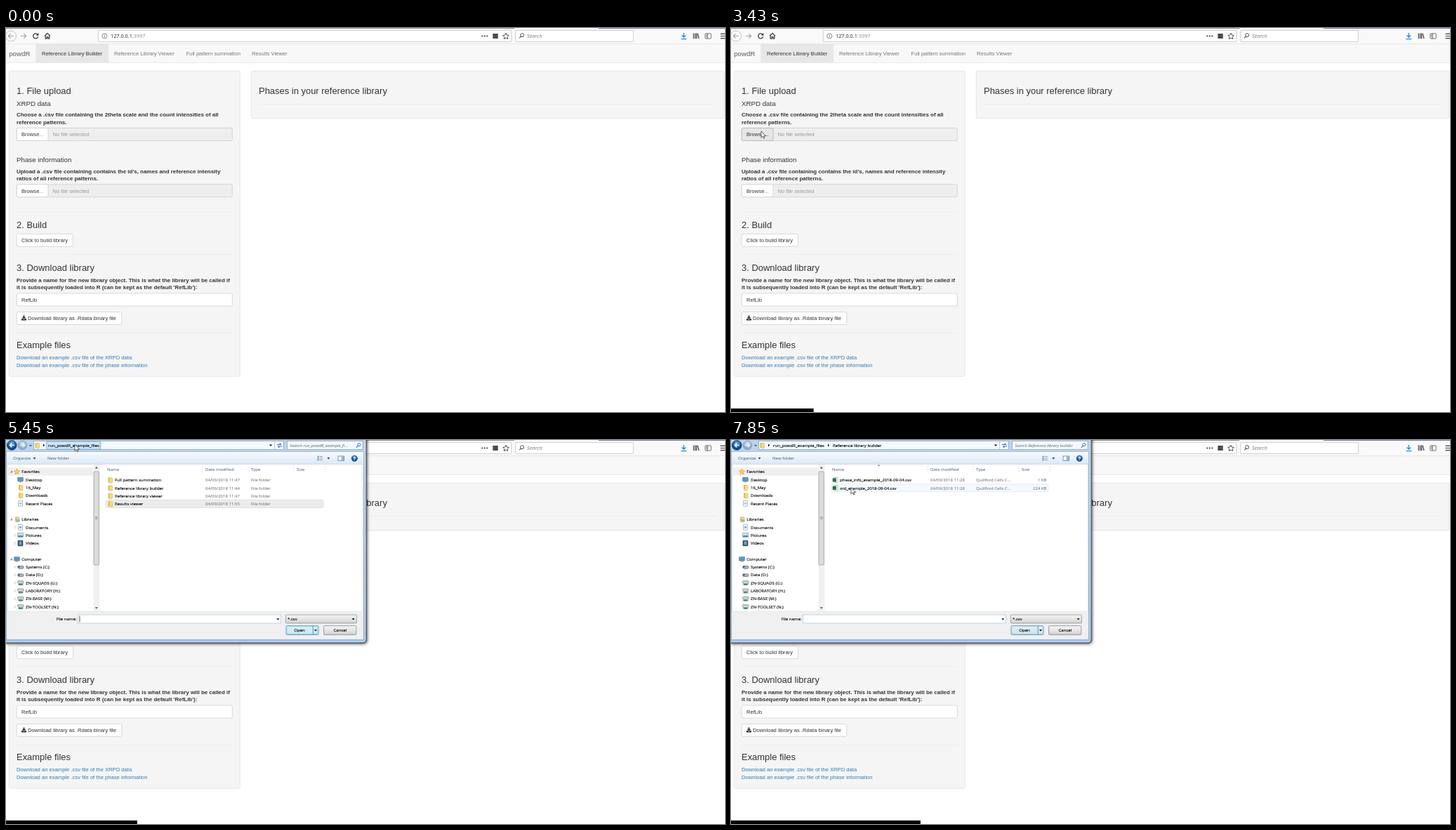
Recreate the animation shown at these times as an HTML page. Size 1024 px wide and 547 px high, loop 8000 ms.

```html
<!DOCTYPE html>
<html lang="en">
<head>
<meta charset="utf-8">
<title>Reference library builder</title>
<style>
html, body { margin: 0; width: 100%; height: 100%; overflow: hidden; background: #fff; }
svg { display: block; width: 100vw; height: 100vh; }
text { font-family: "Liberation Sans", Arial, sans-serif; font-size: 7.62px; fill: #333; white-space: pre; }
.h3 { font-size: 12.96px; }
.h4 { font-size: 9.72px; }
.b { font-size: 7.94px; font-weight: bold; }
.nav { fill: #777; }
.brand { font-size: 9.72px; fill: #5e5e5e; }
.mute { fill: #999; }
.link { fill: #337ab7; }
.url, .find, .d, .dg, .dh, .ds { font-family: "Open Sans", "Noto Sans", sans-serif; }
.url { font-size: 7.3px; fill: #222; }
.find { font-size: 7.3px; font-style: italic; fill: #777; }
.d { font-size: 6.06px; fill: #000; stroke: #000; stroke-width: .12px; }
.dg { font-size: 6.02px; fill: #606060; }
.dh { font-size: 6.1px; fill: #3f546f; }
.ds { font-size: 5.88px; font-style: italic; fill: #606060; }
.mid { text-anchor: middle; }
.end { text-anchor: end; }
</style>
</head>
<body>
<svg id="stage" viewBox="0 0 1024 547">
  <defs>
    <linearGradient id="bar" x2="0" y2="1"><stop stop-color="#f7fbff"/><stop offset="1" stop-color="#dbe7f5"/></linearGradient>
    <linearGradient id="btn" x2="0" y2="1"><stop stop-color="#f4f4f4"/><stop offset=".5" stop-color="#e6e6e6"/><stop offset="1" stop-color="#d0d0d0"/></linearGradient>
    <linearGradient id="glass" x2="0" y2="1"><stop stop-color="#bdd4ee"/><stop offset="1" stop-color="#a3c4e8"/></linearGradient>
    <radialGradient id="blue" cy=".3"><stop stop-color="#6cb4ea"/><stop offset="1" stop-color="#0b4a94"/></radialGradient>
    <radialGradient id="pale" cy=".3"><stop stop-color="#dbe8f6"/><stop offset="1" stop-color="#8fadcf"/></radialGradient>
  </defs>
</svg>
<script>
const svg = document.getElementById('stage');

// Markup helpers
const rect = (x, y, w, h, fill, stroke = 'none', rx = 0, more = '') =>
  `<rect x="${x}" y="${y}" width="${w}" height="${h}" fill="${fill}" stroke="${stroke}" stroke-width=".7" rx="${rx}" ${more}/>`;
const text = (x, y, s, cls = '') => `<text x="${x}" y="${y}" class="${cls}">${s}</text>`;
const path = (d, stroke, w = 1, fill = 'none') =>
  `<path d="${d}" fill="${fill}" stroke="${stroke}" stroke-width="${w}" stroke-linejoin="round"/>`;
const disc = (x, y, r, fill, stroke = 'none', w = .8) =>
  `<circle cx="${x}" cy="${y}" r="${r}" fill="${fill}" stroke="${stroke}" stroke-width="${w}"/>`;
const down = (x, y, c = '#111') => path(`M${x - 2} ${y - 1}h4l-2 2.4z`, 'none', 0, c);
const right = (x, y, c = '#111') => path(`M${x - 1} ${y - 2}v4l2.2-2z`, 'none', 0, c);
const lens = (x, y, r, c) => disc(x + .8, y - .8, r, 'none', c, 1) + path(`M${x - .2} ${y + .4}l-3 3`, c, 1.2);

function layer(markup, parent = svg) {
  const g = document.createElementNS('http://www.w3.org/2000/svg', 'g');
  g.innerHTML = markup;
  parent.append(g);
  return g;
}
const show = (g, on) => g.setAttribute('display', on ? 'inline' : 'none');

// Browser window
function browser() {
  const ink = '#3c3c3f';
  return rect(0, 0, 1024, 22, '#f9f9fa') +
    rect(0, 0, 724, .8, '#70757f') + rect(844, 0, 180, .8, '#4a5f92') +
    disc(7, 11.5, 7.5, '#fbfbfb', '#b5b5b8') +
    path('M11 11.5H3.5M6.6 8.2L3.3 11.5l3.3 3.3M21 11.5h7.5M25.4 8.2l3.3 3.3-3.3 3.3', '#a4a4a8', 1.1) +
    path('M45 9.2A3.5 3.5 0 1 0 45.6 12.5', ink, 1.3) + path('M46.4 7v3.8h-3.8z', 'none', 0, ink) +
    path('M55 11.5L59 7.5l4 4M56.2 11.2v4h1.9v-2.5h1.8v2.5h1.9v-4', ink, 1.2) +
    rect(131.3, 3.4, 588.5, 16, '#fff', '#b9b9bd', 1) +
    disc(140.3, 11.5, 3.5, 'none', '#666') + path('M140.3 11v2.4M140.3 9.2v.9', '#666', .9) +
    text(149, 14.2, '127.0.0.1<tspan fill="#8a8a8a">:3997</tspan>', 'url') +
    [678.3, 681.8, 685.3].map(x => disc(x, 11.5, 1.1, ink)).join('') +
    rect(693.3, 8, 7.4, 7, '#4a4a4f') +
    path('M712 7.3l1.3 2.8 3 .4-2.2 2.1.6 3-2.7-1.5-2.7 1.5.6-3-2.2-2.1 3-.4z', ink, .9) +
    rect(725.8, 3.4, 167.6, 16, '#fff', '#b9b9bd', 1) + lens(734.3, 11, 2.5, '#555') +
    text(742, 14.2, 'Search', 'find') +
    path('M965.3 7v6M962.5 10.4l2.8 2.8 2.8-2.8M961.5 15.6h7.6', '#1c86e8', 1.3) +
    path('M979.3 7.5v7.8M981.6 7.5v7.8M983.6 7.5v7.8M985 7.8l2 7.4', ink, 1.2) +
    rect(995.8, 7.9, 8.4, 7.2, 'none', ink, 1) + path('M999 8v7M997 10h1M997 12h1', ink, .9) +
    path('M1017.5 8.4h7M1017.5 11.5h7M1017.5 14.6h7', ink, 1.2);
}

const fileInput = y => rect(15.3, y, 307, 18, '#eee', '#ccc', 2) +
  rect(15.3, y, 44.7, 18, '#fff', '#ccc', 2) +
  text(22, y + 11.8, 'Browse<tspan fill="#888">...</tspan>') + text(66.5, y + 11.8, 'No file selected', 'mute');

function page() {
  const tabs = [[51, 'Builder'], [154, 'Viewer']];
  const rule = (x, y, w) => rect(x, y, w, .8, '#ececec');
  return rect(0, 22, 1024, 27.5, '#f8f8f8') + rect(0, 22, 1024, .6, '#dedee0') + rect(0, 49.2, 1024, .7, '#e4e4e4') +
    rect(42.3, 22.3, 103.8, 27, '#e7e7e7') +
    text(4.2, 39.6, 'powdR', 'brand') +
    tabs.map(([x, s], i) => text(x, 39, 'Reference Library ' + s, i ? 'nav' : '')).join('') +
    text(256.5, 39, 'Full pattern summation', 'nav') + text(350, 39, 'Results Viewer', 'nav') +
    rect(4.4, 61.3, 328.8, 435, '#f5f5f5', '#dfdfdf', 2) +
    rect(349.3, 61.3, 673.8, 67.5, '#f5f5f5', '#dfdfdf', 2) +
    text(360, 94, 'Phases in your reference library', 'h3') + rule(360, 108, 652) +
    text(15, 94, '1. File upload', 'h3') + text(15, 111, 'XRPD data', 'h4') +
    text(15, 126.4, 'Choose a .csv file containing the 2theta scale and the count intensities of all', 'b') +
    text(15, 137, 'reference patterns.', 'b') + fileInput(142.5) +
    text(15, 191.3, 'Phase information', 'h4') +
    text(15, 206.6, "Upload a .csv file containing contains the id's, names and reference intensity", 'b') +
    text(15, 217.2, 'ratios of all reference patterns.', 'b') + fileInput(222.7) +
    rule(15, 261.5, 307) + text(15, 285.4, '2. Build', 'h3') +
    rect(15.3, 293.3, 80.2, 18, '#fff', '#ccc', 2) + text(22, 305, 'Click to build library') +
    rule(15, 322.3, 307) + text(15, 345.7, '3. Download library', 'h3') +
    text(15, 361.6, 'Provide a name for the new library object. This is what the library will be called if', 'b') +
    text(15, 372.3, "it is subsequently loaded into R (can be kept as the default 'RefLib'):", 'b') +
    rect(15.3, 378, 307, 18, '#fff', '#ccc', 2) + text(22, 389.6, 'RefLib') +
    rect(15.3, 404.5, 149.5, 18, '#fff', '#ccc', 2) +
    path('M24.5 409.5h2v2.6h1.8l-2.8 2.8-2.8-2.8h1.8zM22 414h1.6l1.9 1.6 1.9-1.6h1.6v2.5h-7z', 'none', 0, '#333') +
    text(31, 416.2, 'Download library as .Rdata binary file') +
    rule(15, 434.2, 307) + text(15, 456.2, 'Example files', 'h3') +
    text(15, 472.2, 'Download an example .csv file of the XRPD data', 'link') +
    text(15, 483, 'Download an example .csv file of the phase information', 'link');
}

// File dialog
const PITCH = 11.33;
const treeY = k => 45 + k * PITCH;
const rowY = k => 57 + k * 11.3;

const folder = (x, y) => rect(x - 2.6, y - 3.6, 3, 7, '#e9bf52', 'none', .5) +
  rect(x - 1, y - 3, 4.4, 6.8, '#f8dd85', '#d8ab42', .5);
const screen = (x, y) => rect(x - 3.8, y - 3, 7.6, 5.4, '#4e9bd6', '#56707f', .5) + rect(x - 2, y + 3, 4, .9, '#78909c');
const sheet = (x, y, c) => rect(x - 3, y - 3.8, 6, 7.6, '#fff', '#8d9cab', .4) + rect(x - 1.7, y - 1.6, 3.4, 3.2, c);
const csv = (x, y) => rect(x - 1, y - 3.6, 4.6, 7.2, '#fff', '#7fa98c', .4) + rect(x - 3.8, y - 2.6, 5.2, 5.2, '#217346');
const disk = (x, y) => rect(x - 3.6, y - 1.6, 8.2, 4, '#aab0b5', '#6b7278', 1.8) + disc(x - 2.4, y - .4, 1.5, '#555b61');
const share = (x, y) => rect(x - 3.8, y - 3, 8.2, 3.8, '#cfd6da', '#717b80', 1) +
  rect(x - 2.3, y + 1.2, 5.2, 2.2, '#46a05a') + rect(x - 3.6, y + 2, 8, .7, '#3a7d4a');
const star = (x, y) => path(`M${x} ${y - 4}l1.2 2.7 2.9.3-2.2 2 .7 2.9-2.6-1.5-2.6 1.5.7-2.9-2.2-2 2.9-.3z`, '#d99a2b', .6, '#fbd14b');
const shelf = (x, y) => folder(x, y) + rect(x - 1, y, 5, 3.4, '#7fc0d8');
const picture = (x, y) => rect(x - 3.8, y - 3, 7.8, 6, '#bfe3f5', '#8a9aa5') + rect(x - 3.2, y + .4, 6.6, 2, '#3b9a8d');
const film = (x, y) => rect(x - 3.4, y - 3.8, 6.8, 7.6, '#31506f', '#22303f', .4) + rect(x - 1.8, y - 2.6, 3.6, 5, '#6ea6d3');

// row, icon, label, has children
const TREE = [
  [0, star, 'Favorites'], [1, screen, 'Desktop'], [2, folder, '16_May'], [3, folder, 'Downloads'],
  [4, (x, y) => sheet(x, y, '#b9c9d8'), 'Recent Places'],
  [6, shelf, 'Libraries'], [7, (x, y) => sheet(x, y, '#7fb2dd'), 'Documents', 1], [8, picture, 'Pictures', 1], [9, film, 'Videos', 1],
  [11, screen, 'Computer'], [12, disk, 'Systems (C:)', 1], [13, disk, 'Data (D:)', 1], [14, share, 'ZN-SQUADS (G:)', 1],
  [15, share, 'LABORATORY (H:)', 1], [16, share, 'ZN-BASE (M:)', 1], [17, share, 'ZN-TOOLSET (N:)', 1]
];
const isRoot = k => k === 0 || k === 6 || k === 11;

function dialogFrame() {
  return rect(-4, -8, 516.8, 296.8, 'url(#glass)', '#16202c', 4, 'style="filter:drop-shadow(1px 1.5px 2px rgba(0,0,0,.85))"') +
    rect(-3, -8, 515, 295.8, 'none', '#dcebfa', 3.5) +
    down(35, 8, '#43566d') +
    rect(39.4, 1.3, 356, 12.4, '#f4f8fd', '#7f9ab8') + path('M382.5 1.5v12', '#a9bdd4', .7) + folder(44, 7.5) +
    right(54, 7.5) + down(377, 7.5) +
    path('M386 6.5h5.5l-1.8-1.8M393 9h-5.5l1.8 1.8', '#2b6cb5', 1.1) +
    rect(400.3, 1.3, 107.8, 12.4, '#f4f8fd', '#7f9ab8') + lens(502, 7.4, 2, '#3f6fa8') +
    rect(1, 16.5, 508, 267.5, '#fff', '#8299b4') + rect(1.2, 16.8, 507.6, 17.6, 'url(#bar)') + rect(1.2, 34.2, 507.6, .6, '#b9cbe0') +
    text(10, 28.2, 'Organize', 'dh') + down(40.5, 26, '#1e395b') + text(59, 28.2, 'New folder', 'dh') +
    path('M443.5 23.5h2M443.5 26h2M443.5 28.5h2', '#3d77b0', 1.3) + path('M446.5 23.5h4.5M446.5 26h4.5M446.5 28.5h4.5', '#8b9cae', .9) +
    down(459.3, 26, '#1e395b') + rect(473, 23, 8.4, 6.3, '#fff', '#47698f') + rect(477.5, 23.4, 3.5, 5.5, '#8fb8e0') +
    disc(496.3, 26.2, 4.2, 'url(#blue)', '#1b4272', .5) +
    `<text x="496.3" y="28.5" class="mid" style="fill:#fff;font-weight:bold;font-size:6.4px">?</text>` +
    rect(124.6, 35, 8.6, 208.5, '#f0f0f0') + rect(125, 45, 7.4, 133, '#dcdcdc', '#979797', 1) +
    path('M127 109.5h3.5M127 111h3.5M127 112.5h3.5', '#777', .6) +
    down(128.8, 239.2, '#444') + path('M126.8 40.5h4l-2-2.4z', 'none', 0, '#444') +
    [[144, 'Name'], [284, 'Date modified'], [349, 'Type'], [414, 'Size']].map(([x, s]) => text(x, 43.8, s, 'dh')).join('') +
    path('M279.5 36v11M345 36v11M409.5 36v11M454 36v11', '#e6eaee', .7) +
    rect(1.2, 244, 507.6, 39.8, '#f0f0f0') + rect(1.2, 243.7, 507.6, .6, '#dfdfdf') +
    text(100.5, 257.2, 'File name:', 'd end') + rect(102.6, 249, 289, 12, '#fff', '#a9c4de') + down(387.3, 255.3) +
    rect(398.4, 249, 101, 12, 'url(#btn)', '#8a8a8a', 1) + text(401, 257.2, '*.csv', 'd') + down(494.6, 255) +
    rect(452.6, 264.6, 46.2, 12.8, 'url(#btn)', '#7b7b7b', 1.4) + text(475.9, 273.2, 'Cancel', 'd mid') +
    rect(399, 264.6, 46, 12.8, 'url(#btn)', '#3c7fb1', 1.4) +
    rect(1.3, treeY(0) - 5.6, 123, 11.2, '#efefef');
}
const tree = () => TREE.map(([k, icon, s]) =>
  icon(isRoot(k) ? 15.5 : 20.5, treeY(k)) + text(isRoot(k) ? 22.3 : 28, treeY(k) + 2.2, s, 'd')).join('');
const expanders = () => TREE.map(([k, , , kids]) => isRoot(k)
  ? path(`M9 ${treeY(k) - 1.8}v3.4h-3.4z`, 'none', 0, '#333')
  : kids ? path(`M12 ${treeY(k) - 2}v4l2.6-2z`, '#9a9a9a', .6, '#fff') : '').join('');

const sorted = path('M208.5 37h4l-2-2z', 'none', 0, '#6b8fb5');
const crumb = s => right(139, 7.5) + text(145, 9.8, s, 'd');
const search = s => text(404.5, 9.8, 'Search ' + s, 'ds');
const details = (k, time, type) => text(284, rowY(k) + 2.2, '04/09/2018 ' + time, 'dg') + text(349, rowY(k) + 2.2, type, 'dg');

function folders() {
  const rows = [['Full pattern summation', 47], ['Reference library builder', 44], ['Reference library viewer', 47], ['Results viewer', 55]];
  return search('run_powdR_example_fi...') + rows.map(([s, min], k) =>
    folder(148, rowY(k)) + text(155, rowY(k) + 2.2, s, 'd') + details(k, '11:' + min, 'File folder')).join('');
}
function files() {
  const rows = [['phase_info', 1], ['xrd', 224]];
  return sorted + search('Reference library builder') + crumb('Reference library builder') + rows.map(([s, kb], k) =>
    csv(148.5, rowY(k)) + text(155, rowY(k) + 2.2, s + '_example_2018-09-04.csv', 'd') +
    details(k, '11:28', 'Quillford Cells C...') + text(449.5, rowY(k) + 2.2, kb + ' KB', 'dg end')).join('');
}
const rowBox = (fill, stroke) => rect(142.4, 0, 309.4, 11, fill, stroke, 1.2);

// Layers, back to front
layer(browser() + page());
const browseHover = layer(rect(15.3, 142.5, 44.7, 18, '#e6e6e6', '#adadad', 2) + text(22, 154.3, 'Browse...'));
const dialog = layer('');
const add = markup => layer(markup, dialog);
add(dialogFrame());
const treeHover = add(rect(1.3, -5.6, 123, 11.2, '#f2f8fe', '#dcebf8'));
const arrows = add(expanders());
add(tree());
const grayRow = add(rowBox('#ececec', '#d6d6d6'));
grayRow.setAttribute('transform', `translate(0 ${rowY(3) - 5.5})`);
const rowHover = add(rowBox('#f4f9fe', '#d8e9f8'));
const rowPick = add(rowBox('#d9eafc', '#9cc5ec'));
const crumbHover = add(rect(57.8, 2, 77, 11.2, '#cfe6f8', '#5d97c4', .6));
add(text(60, 9.8, 'run_powdR_example_files', 'd'));
const crumbTail = add(right(139, 7.5));
const empty = add(sorted + search('Results viewer') + crumb('Results viewer') + text(281, 62.3, 'No items match your search.', 'dg'));
const top4 = add(folders());
const inner = add(files());
const backOff = disc(8.3, 7.5, 6.8, 'url(#pale)', '#7e95b0') + path('M11.5 7.5h-6M8 4.8L5.3 7.5 8 10.2', '#eef4fa', 1.3);
const backOn = disc(8.3, 7.5, 6.8, 'url(#blue)', '#1d3f6b') + path('M11.8 7.5h-6M8.2 4.6L5.3 7.5l2.9 2.9', '#fff', 1.6);
add(backOff + disc(23.5, 7.5, 6.2, 'url(#pale)', '#7e95b0') + path('M20.5 7.5h6M24 4.8l2.7 2.7-2.7 2.7', '#eef4fa', 1.3));
const back = add(backOn);
const glow = add(rect(399.8, 265.4, 44.4, 11.2, '#d2ecf9', '#48cdf5', 1));
const openOne = add(text(422, 273.2, 'Open', 'd mid'));
const openTwo = add(text(418, 273.2, 'Open', 'd mid') + path('M437.2 265v12', '#3c7fb1', .8) + down(441, 271));
const caret = add(rect(104.6, 250.6, .7, 8.8, '#111'));
const bar = layer(rect(0, 542, 1, 5, '#000')).firstChild;
const cursor = layer('');
const arrow = layer(path('M0 0V9.2L2.1 7.2 3.6 10.4 5 9.8 3.6 6.8H6.5Z', '#222', .7, '#fff'), cursor);
const hand = layer(path('M-.9 .8q.9-1.2 1.8 0V4.2q1-.6 1.6.2q1-.4 1.5.3q1.2-.2 1.3 1V8.5L4.6 11.5H-.3L-3.2 7.6q-.4-1.4 .9-1L-.9 7.6Z', '#222', .7, '#fff'), cursor);

// Timing: 200 ms per step with a few exceptions
const ODD = { 5: 190, 9: 210, 15: 210, 16: 220, 24: 220, 28: 220, 31: 180, 34: 220, 36: 180, 39: 150 };
const LOOP = 8000, STEPS = 40;
function stepAt(t) {
  let n = 0;
  while (n < STEPS - 1 && (t -= ODD[n] || 200) >= 0) n++;
  return n;
}

// step, x, y of the pointer
const PATH = [[1, 897, 405], [2, 858, 387], [3, 770, 330], [4, 435, 265], [6, 144, 72], [8, 118, 38], [10, 100, 26.3], [11, 98, 27],
  [12, 92, 34], [14, 62, 100], [16, 43, 147], [17, 43, 147], [18, 43, 145], [19, 45, 143], [22, 72, 84], [24, 94, 40],
  [25, 98, 12], [27, 98, 6.3], [28, 98, 6.3], [30, 104, 9], [33, 157.5, 48.7], [35, 163, 66], [39, 171, 67.6]];
function pointAt(n) {
  const i = Math.max(1, PATH.findIndex(p => p[0] >= n));
  const [a, x, y] = PATH[i - 1], [b, u, v] = PATH[i];
  const k = (n - a) / (b - a);
  return [x + (u - x) * k, y + (v - y) * k];
}

function draw(t) {
  const n = stepAt(t), [x, y] = pointAt(n);
  bar.setAttribute('width', n * 6.92);
  show(cursor, n > 0);
  cursor.setAttribute('transform', `translate(${x} ${y})`);
  const pointing = n === 18 || (n < 18 && y < 49);
  show(hand, pointing);
  show(arrow, !pointing);
  show(browseHover, n === 16 || n === 17);

  const open = n >= 18, loaded = n >= 26, inside = n >= 37;
  show(dialog, open);
  if (!open) return;
  show(empty, !loaded);
  show(top4, loaded && !inside);
  show(inner, inside);
  show(back, loaded);
  show(openOne, !loaded);
  show(openTwo, loaded);
  show(caret, !inside);
  const onCrumb = n >= 25 && n <= 30;
  show(crumbHover, onCrumb);
  show(crumbTail, loaded && !inside && !onCrumb);
  arrows.setAttribute('opacity', Math.max(0, Math.min(1, (31 - n) / 7)));
  glow.setAttribute('opacity', .6 + .15 * Math.cos(n * .7));

  const branch = Math.round((y - 45) / PITCH);
  show(treeHover, x < 124 && y > 39 && TREE.some(r => r[0] === branch));
  treeHover.setAttribute('transform', `translate(0 ${treeY(branch)})`);
  const row = Math.floor((y - 51.5) / 11.3);
  const picked = n === 36;
  show(grayRow, loaded && !inside && !picked);
  show(rowHover, x > 142 && row >= 0 && !picked);
  show(rowPick, picked);
  for (const g of [rowHover, rowPick]) g.setAttribute('transform', `translate(0 ${rowY(row) - 5.5})`);
}

const start = performance.now();
function tick(now) {
  draw(Math.max(0, now - start) % LOOP);
  requestAnimationFrame(tick);
}
draw(0);
requestAnimationFrame(tick);
</script>
</body>
</html>
```
